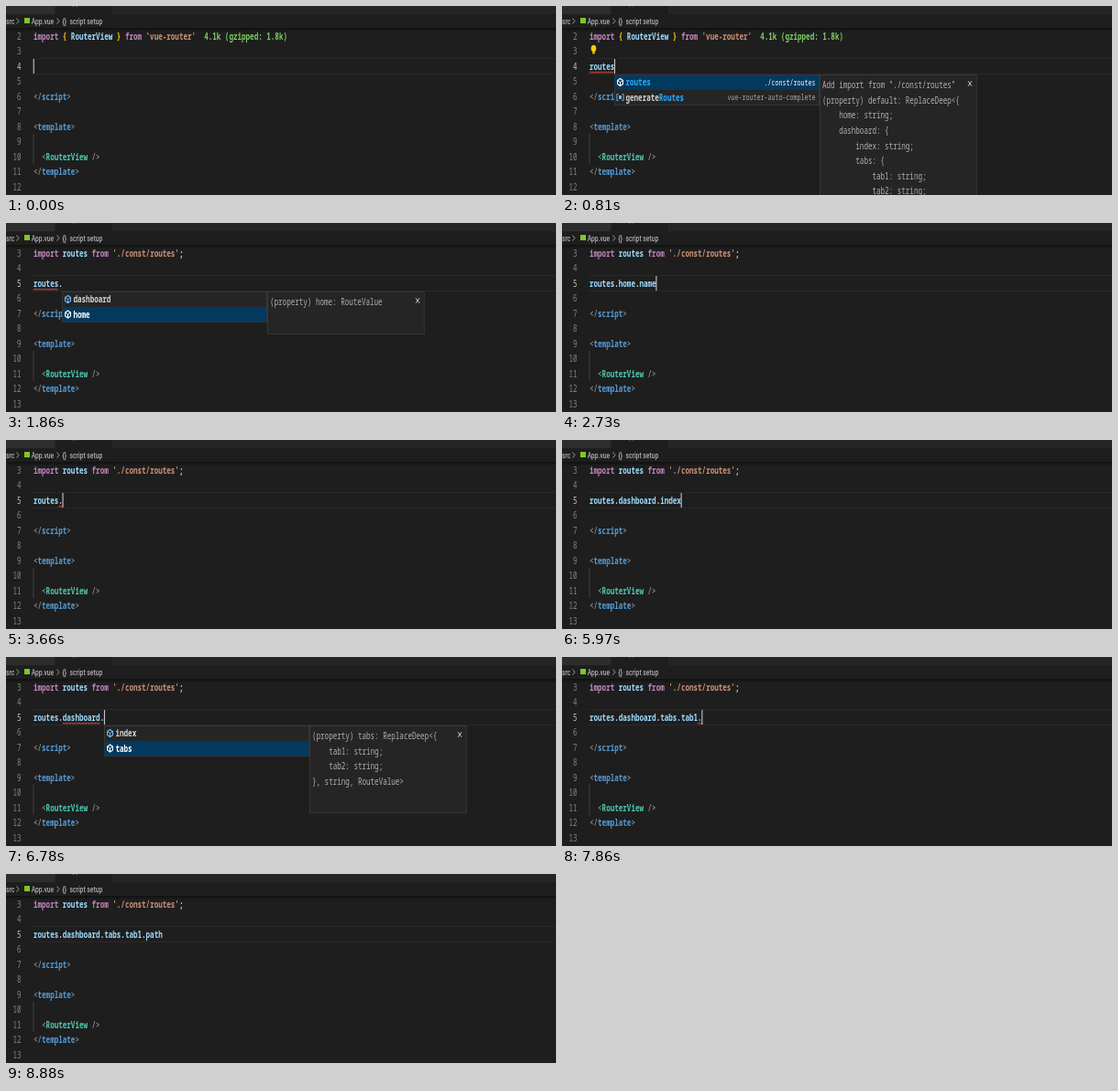
Write an HTML page with a canvas that moves like this. It is 600 by 207 pixels and loops after 9000 ms.

```html
<!DOCTYPE html>
<html lang="en">
<head>
<meta charset="utf-8">
<title>Route completion</title>
<style>
html, body { margin: 0; width: 600px; height: 207px; overflow: hidden; background: #1e1e1e; }
canvas { display: block; }
</style>
</head>
<body>
<canvas id="stage" width="600" height="207"></canvas>
<script>
const ctx = document.getElementById('stage').getContext('2d');
const LOOP = 9000;
const SQUASH = 0.688;          // the editor view is narrower than it is tall
const CHAR = 4.54, LINE = 16.5, LEFT = 30;
const MONO = '"Noto Sans Mono", "DejaVu Sans Mono", monospace';
const SANS = 'Roboto, "Noto Sans", sans-serif';
const C = {
  bg: '#1e1e1e', panel: '#252526', edge: '#404040', pick: '#04395e',
  key: '#c586c0', brace: '#ffd700', name: '#9cdcfe', str: '#ce9178',
  size: '#7ccc63', punct: '#808080', tag: '#569cd6', comp: '#4ec9b0',
  plain: '#d4d4d4', dim: '#858585', info: '#b0b0b0', match: '#2aaaff',
  cube: '#75beff', error: '#f14c4c'
};

// Completion lists: [label, detail lines]
const value = n => ['(property) ' + n + ': RouteValue'];
const leaf = n => [n, ['(property) RouteValue.' + n + ': string']];
const menus = {
  add: [
    ['routes', ['Add import from "./const/routes"', '(property) default: ReplaceDeep<{',
      '    home: string;', '    dashboard: {', '        index: string;', '        tabs: {',
      '            tab1: string;', '            tab2: string;', '        };']],
    ['generateRoutes', []]
  ],
  root: [
    ['dashboard', ['(property) dashboard: ReplaceDeep<{', '    index: string;', '    tabs: {',
      '        tab1: string;', '        tab2: string;', '    };', '}, string, RouteValue>']],
    ['home', value('home')]
  ],
  dash: [
    ['index', value('index')],
    ['tabs', ['(property) tabs: ReplaceDeep<{', '    tab1: string;', '    tab2: string;',
      '}, string, RouteValue>']]
  ],
  tabs: [['tab1', value('tab1')], ['tab2', value('tab2')]],
  leaf: [leaf('name'), leaf('path')]
};

// Timeline of editor states
const steps = [];
let buffer = '', edited = 0;
function push(at, menu, sel) {
  steps.push({ at, text: buffer, edited, menu, sel: sel || 0 });
}
function set(at, text) {
  buffer = text;
  edited = at;
  push(at);
}
function type(at, word, gap) {
  [...word].forEach((c, i) => set(at + i * gap, buffer + c));
}
function erase(at, count, gap) {
  for (let i = 0; i < count; i++) set(at + i * gap, buffer.slice(0, -1));
}

set(0, '');
type(150, 'routes', 90);
push(690, 'add');
set(1020, 'routes');
type(1350, '.', 0);
push(1470, 'root');
push(1740, 'root', 1);
set(1950, 'routes.home');
type(2160, '.', 0);
push(2280, 'leaf');
set(2700, 'routes.home.name');
erase(2940, 9, 70);
push(3690, 'root');
set(3870, 'routes.dashboard');
type(4110, '.', 0);
push(4230, 'dash');
set(4590, 'routes.dashboard.index');
type(4740, '.', 0);
push(4860, 'leaf');
set(5340, 'routes.dashboard.index.name');
erase(5670, 10, 70);
push(6390, 'dash');
push(6600, 'dash', 1);
set(6900, 'routes.dashboard.tabs');
type(7080, '.', 0);
push(7200, 'tabs');
set(7620, 'routes.dashboard.tabs.tab1');
type(7800, '.', 0);
push(7920, 'leaf');
push(8310, 'leaf', 1);
set(8550, 'routes.dashboard.tabs.tab1.path');

const IMPORTED = 1020;
const rowY = i => 33 + LINE * i;
const colX = n => LEFT + CHAR * n;

function rect(x, y, w, h, color) {
  ctx.fillStyle = color;
  ctx.fillRect(x, y, w, h);
}
function path(points, color, width, closed) {
  ctx.beginPath();
  points.forEach(([x, y]) => ctx.lineTo(x, y));
  if (closed) ctx.closePath();
  ctx.strokeStyle = color;
  ctx.lineWidth = width;
  ctx.stroke();
}
// y is the middle of the capitals
function write(s, x, y, color, size = 11, face = MONO, align = 'left', weight = 600) {
  ctx.save();
  ctx.translate(x, y + size * 0.36);
  ctx.scale(SQUASH, 1);
  ctx.font = weight + ' ' + size + 'px ' + face;
  ctx.textAlign = align;
  ctx.fillStyle = color;
  ctx.fillText(s, 0, 0);
  ctx.restore();
}
function code(row, col, parts) {
  for (const [s, color] of parts) {
    write(s, colX(col), rowY(row), color);
    col += s.length;
  }
}
function tag(row, col, open, name, close, color) {
  code(row, col, [[open, C.punct], [name, color], [close, C.punct]]);
}

function drawHeader(faulty) {
  rect(0, 0, 600, 9, C.panel);
  rect(0, 0, 53, 9, '#2d2d2d');
  rect(54, 0, 62, 9, C.bg);
  write('App.vue', 68, -5, faulty ? '#e0605a' : '#c8c8c8', 10, SANS, 'left', 400);
  const label = (s, x, color = '#b0b0b0') => write(s, x, 16.5, color, 9.8, SANS, 'left', 500);
  const arrow = x => path([[x, 13.5], [x + 2.5, 16.5], [x, 19.5]], '#9a9a9a', 1);
  label('src', 0);
  arrow(11.5);
  rect(20, 13, 6, 6, '#7fc728');
  label('App.vue', 27.7);
  arrow(55.5);
  label('{}', 61.5, '#cccccc');
  label('script setup', 69.5);
  const shade = ctx.createLinearGradient(0, 24, 0, 28);
  shade.addColorStop(0, 'rgba(0,0,0,.5)');
  shade.addColorStop(1, 'rgba(0,0,0,0)');
  rect(0, 24, 600, 4, shade);
}

function drawCode(text, first) {
  path([[28, 57.5], [600, 57.5]], '#292929', 1);
  path([[28, 74.5], [600, 74.5]], '#292929', 1);
  for (let i = 0; i < 11; i++) {
    write(String(first + i), 16.5, rowY(i), i === 2 ? '#c6c6c6' : C.dim, 11, MONO, 'right', 500);
  }
  if (first === 2) {
    code(0, 0, [['import ', C.key], ['{ ', C.brace], ['RouterView ', C.name], ['} ', C.brace],
      ['from ', C.key], ["'vue-router'", C.str], ['  4.1k (gzipped: 1.8k)', C.size]]);
  } else {
    code(0, 0, [['import ', C.key], ['routes ', C.name], ['from ', C.key],
      ["'./const/routes'", C.str], [';', C.plain]]);
  }
  text.split(/(\.)/).reduce((col, s) => {
    code(2, col, [[s, s === '.' ? C.plain : C.name]]);
    return col + s.length;
  }, 0);
  tag(4, 0, '</', 'script', '>', C.tag);
  tag(6, 0, '<', 'template', '>', C.tag);
  rect(29.5, 140, 1, 33, '#404040');
  tag(8, 2, '<', 'RouterView', ' />', C.comp);
  tag(9, 0, '</', 'template', '>', C.tag);
}

function drawSquiggle(step) {
  const dotted = step.text.endsWith('.');
  if (!step.menu && !dotted) return;
  const end = step.text.length - (dotted && step.menu ? 1 : 0);
  const start = step.menu ? step.text.lastIndexOf('.', end - 1) + 1 : end - 1;
  const points = [];
  for (let x = colX(start), i = 0; x <= colX(end); x += 1.4, i++) {
    points.push([x, i % 2 ? 71.8 : 73.6]);
  }
  path(points, C.error, 0.9);
}

function drawBulb() {
  ctx.beginPath();
  ctx.ellipse(34.5, 46.5, 2.8, 3.8, 0, 0, Math.PI * 2);
  ctx.fillStyle = '#ffcc00';
  ctx.fill();
  rect(33.2, 49.5, 2.6, 3, '#e8b800');
}

function cube(x, y, color) {
  path([[x, y - 4], [x + 2.9, y - 2], [x + 2.9, y + 2], [x, y + 4], [x - 2.9, y + 2], [x - 2.9, y - 2]],
    color, 1.1, true);
  path([[x - 2.9, y - 2], [x, y], [x + 2.9, y - 2]], color, 1);
  path([[x, y], [x, y + 4]], color, 1);
}
function bracketIcon(x, y) {
  for (const d of [-1, 1]) {
    path([[x + d * 2, y - 3.5], [x + d * 3.6, y - 3.5], [x + d * 3.6, y + 3.5], [x + d * 2, y + 3.5]],
      C.cube, 0.9);
  }
  rect(x - 1.4, y - 2, 2.8, 4, C.cube);
}

function panel(x, y, w, h) {
  rect(x, y, w, h, C.edge);
  rect(x + 0.7, y + 0.7, w - 1.4, h - 1.4, C.panel);
}

function drawMenu(step) {
  const items = menus[step.menu], adding = step.menu === 'add';
  const x = Math.round(colX(step.text.length) - 0.4), top = 75, width = 224;
  const rowH = 16.3;
  panel(x, top, width, rowH * 2 + 1.2);
  items.forEach(([label], i) => {
    const y = 83.5 + LINE * i, on = i === step.sel;
    if (on) rect(x + 0.7, top + 0.6 + rowH * i, width - 1.4, rowH, C.pick);
    if (adding && i) bracketIcon(x + 6.5, y);
    else cube(x + 6.5, y, on ? '#ffffff' : C.cube);
    const tint = on ? '#ffffff' : C.plain;
    if (adding) {
      const cut = label.length - 6;
      write(label.slice(0, cut), x + 12.5, y, tint);
      write(label.slice(cut), x + 12.5 + cut * CHAR, y, C.match, 11, MONO, 'left', 700);
      write(i ? 'vue-router-auto-complete' : './const/routes', x + width - 4.5, y,
        on ? '#ffffff' : '#a8a8a8', 9.7, MONO, 'right', 500);
    } else {
      write(label, x + 12.5, y, tint);
    }
  });
  const lines = items[step.sel][1], left = x + width, w = 171.5;
  panel(left, top, w, lines.length * 16.4 + 30.5);
  lines.forEach((s, i) => write(s, left + 3, 86.3 + 16.6 * i, C.info, 11, MONO, 'left', 500));
  const cx = left + w - 7.5, cy = 85;
  path([[cx - 2, cy - 2.8], [cx + 2, cy + 2.8]], '#c5c5c5', 1);
  path([[cx + 2, cy - 2.8], [cx - 2, cy + 2.8]], '#c5c5c5', 1);
}

function draw(t) {
  let step = steps[0];
  for (const s of steps) if (s.at <= t) step = s;
  rect(0, 0, 600, 207, C.bg);
  drawHeader(step.text !== '' && t < 8700);
  drawCode(step.text, t < IMPORTED ? 2 : 3);
  drawSquiggle(step);
  if (step.menu === 'add') drawBulb();
  if (step.menu) drawMenu(step);
  const lit = Math.floor((t - step.edited) / 500) % 2 === 0;
  if (lit && t < 8850) rect(colX(step.text.length) - 0.3, 58, 1.1, 16, '#c8c8c8');
}

const begin = performance.now();
function tick() {
  draw((performance.now() - begin) % LOOP);
  requestAnimationFrame(tick);
}
draw(0);
requestAnimationFrame(tick);
</script>
</body>
</html>
```
